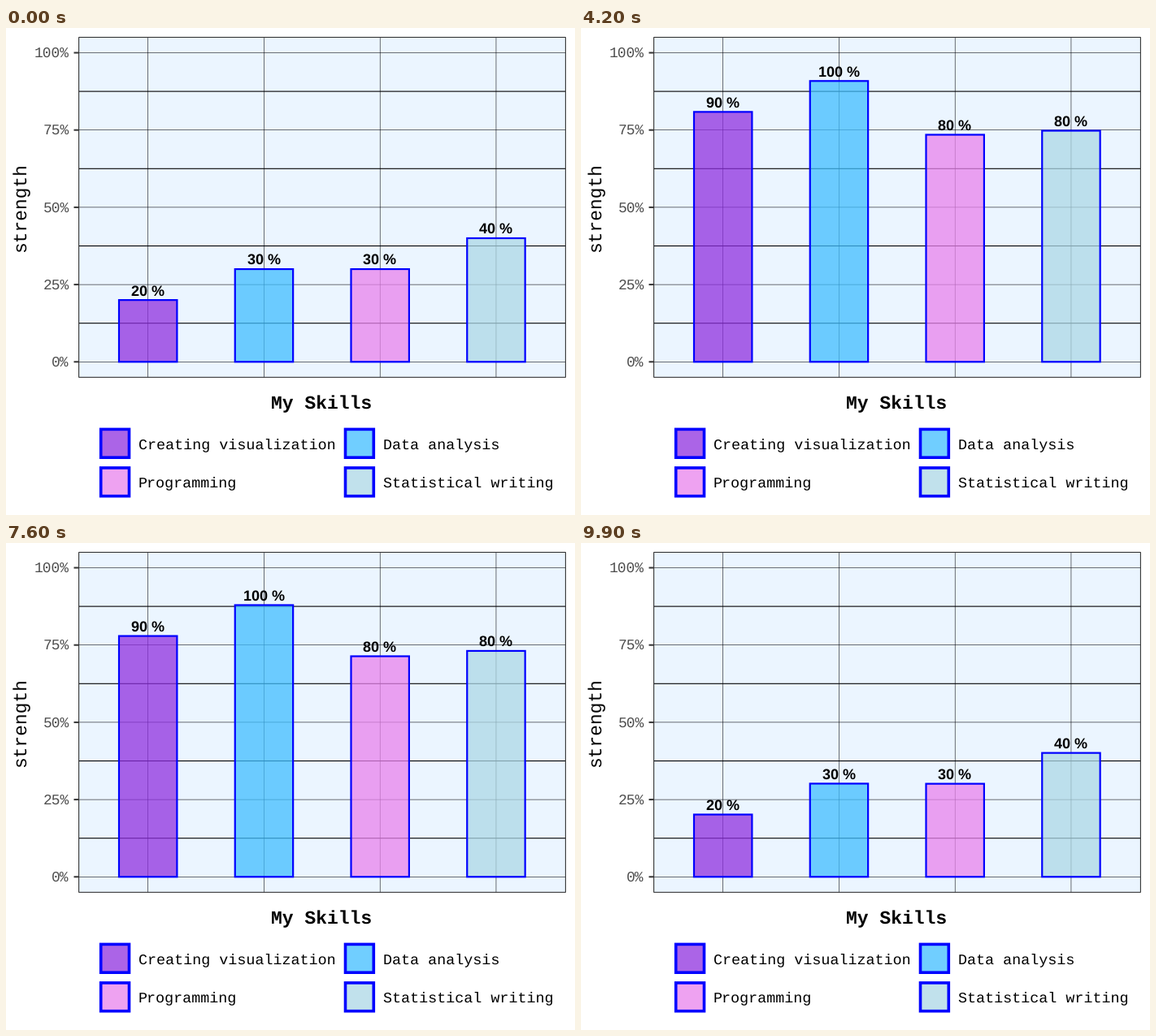
Animation, 700 px wide and 600 px high, one loop 10000 ms. Source, as a matplotlib script:

```python
import math

import matplotlib.pyplot as plt
from matplotlib.animation import FuncAnimation
from matplotlib.patches import Rectangle

plt.rcParams["text.hinting"] = "none"

WIDTH, HEIGHT, DPI = 700, 600, 100
PX = 72 / DPI  # points per pixel
FRAMES, INTERVAL = 100, 100

LEFT, RIGHT = 89.6, 688.4
ZERO, PERCENT = 411.3, 3.808  # baseline and pixels per percent
BAR_WIDTH = 71.4
CENTERS = [174.7 + 142.75 * i for i in range(4)]
ALPHA = 0.75
BORDER = "#0000ff"
MONO = "Liberation Mono"

SKILLS = [  # name, colour, low, high, legend corner
    ("Creating visualization", "#8f30e0", 20, 90, (116.7, 494.4)),
    ("Data analysis", "#40beff", 30, 100, (417.5, 494.4)),
    ("Programming", "#e983ed", 30, 80, (116.7, 541.9)),
    ("Statistical writing", "#add8e6", 40, 80, (417.5, 541.9)),
]


def y_at(value):
    return ZERO - value * PERCENT


def line(x0, y0, x1, y1, width, color="black", z=1):
    ax.plot([x0, x1], [y0, y1], color=color, lw=width * PX, zorder=z,
            solid_capstyle="butt", snap=False)


def label(x, y, text, size, **style):
    options = dict(family=MONO, color="black", va="baseline", zorder=6)
    return ax.text(x, y, text, fontsize=size * PX, **{**options, **style})


def rect(x, y, w, h, **style):
    return ax.add_patch(Rectangle((x, y), w, h, snap=False,
                                  joinstyle="miter", **style))


def box(x, y, w, h, fill, width, z):
    """Translucent fill under an opaque blue outline."""
    return [rect(x, y, w, h, fc=fill, ec="none", alpha=ALPHA, zorder=z),
            rect(x, y, w, h, fc="none", ec=BORDER, lw=width * PX,
                 zorder=z + 0.1)]


fig = plt.figure(figsize=(WIDTH / DPI, HEIGHT / DPI), dpi=DPI, facecolor="white")
ax = fig.add_axes([0, 0, 1, 1])
ax.set_xlim(0, WIDTH)
ax.set_ylim(HEIGHT, 0)
ax.axis("off")

# Panel, grid and axis
top, bottom = y_at(105), y_at(-5)
panel = LEFT, top, RIGHT - LEFT, bottom - top
rect(*panel, fc="#ebf5ff", ec="none", zorder=0)
rect(*panel, fc="none", ec="#333333", lw=1.1 * PX, zorder=5)
for value in (12.5, 37.5, 62.5, 87.5):
    line(LEFT, y_at(value), RIGHT, y_at(value), 1.1)
for value in range(0, 101, 25):
    y = y_at(value)
    line(LEFT, y, RIGHT, y, 0.55)
    line(83.5, y, LEFT, y, 2, "#333333")
    text = f"{value}%"
    label(77.9 - 10.75 * len(text), y + 5.8, text, 17.9, color="#4d4d4d")
for x in CENTERS:
    line(x, top, x, bottom, 0.55)

label(24.5, 275.7, "strength", 22.9, rotation=90, rotation_mode="anchor")
label(326.3, 469.5, "My Skills", 23.05, weight="bold")

# Legend and bars
bars, captions = [], []
for x, (name, color, low, high, (kx, ky)) in zip(CENTERS, SKILLS):
    box(kx, ky, 34.8, 34.8, color, 3.6, 2)
    label(kx + 46, ky + 23.8, name, 18.35)
    bars.append(box(x - BAR_WIDTH / 2, ZERO, BAR_WIDTH, 0, color, 2.2, 3))
    captions.append(label(x - 0.4, 0, "", 18, family="Liberation Sans",
                          weight="bold", ha="center"))


def progress(frame):
    """Linear position between the low (0) and high (1) states."""
    if frame < 67:
        return min(max((frame - 16) / 34, 0), 1)
    return 1 - (frame - 67) / 33


def update(frame):
    p = progress(frame)
    eased = 0.5 - 0.5 * math.cos(math.pi * p)
    for (_, _, low, high, _), parts, caption in zip(SKILLS, bars, captions):
        y = y_at(low + (high - low) * eased)
        for part in parts:
            part.set_y(y)
            part.set_height(ZERO - y)
        caption.set_y(y - 5.8)
        caption.set_text(f"{high if p > 0.5 else low} %")
    return [part for parts in bars for part in parts] + captions


anim = FuncAnimation(fig, update, frames=FRAMES, interval=INTERVAL,
                     repeat=True, repeat_delay=0, blit=False)
plt.show()
```
